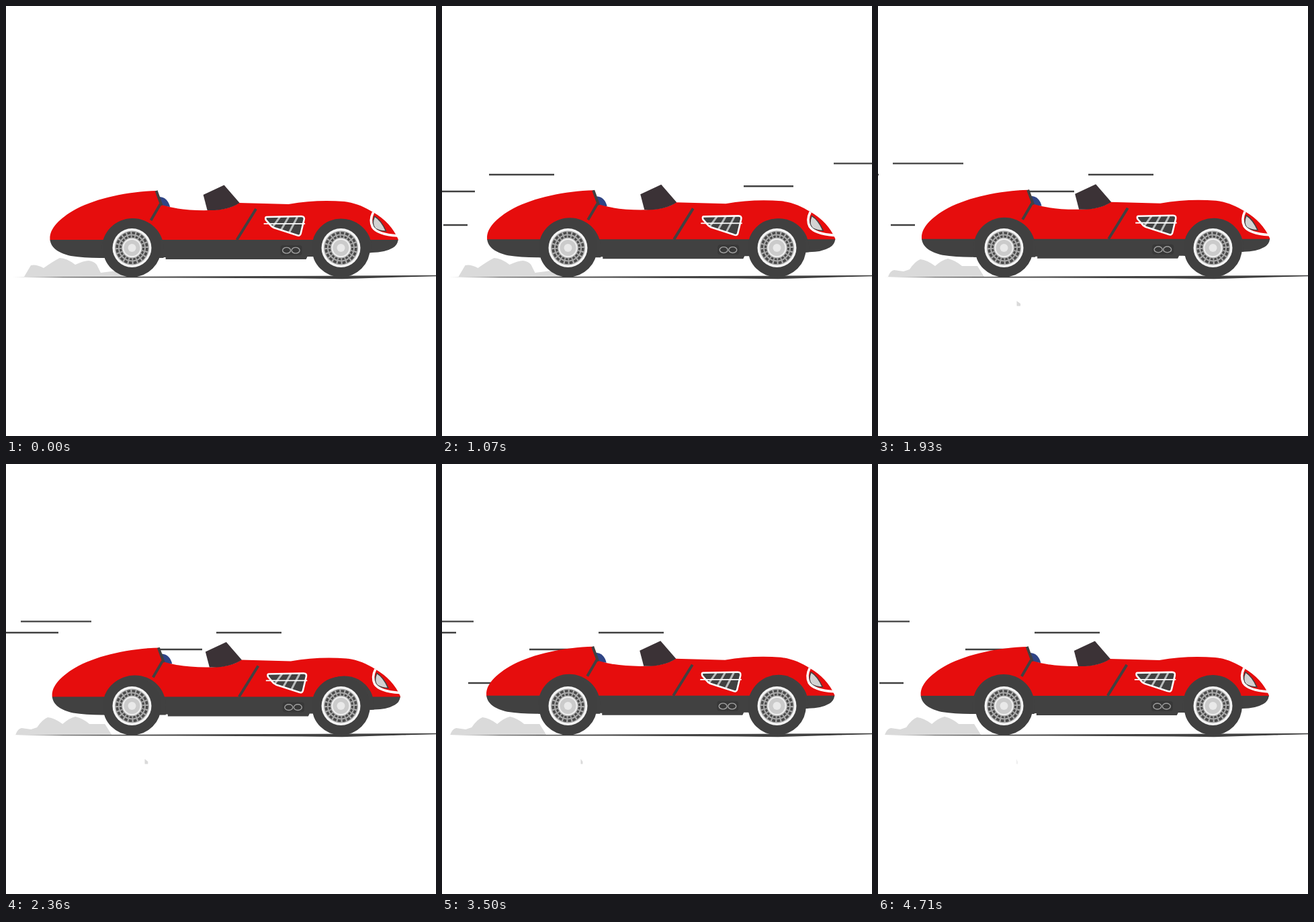
An HTML page that plays this animation: 640 px wide and 640 px high, repeating every 4.78 s.

```html
<!DOCTYPE html>
<html lang="en">
<head>
<meta charset="utf-8">
<title>Racing car</title>
<style>
  html, body { margin: 0; width: 100%; height: 100%; overflow: hidden; background: #fff; }
  svg { display: block; width: 100vw; height: 100vh; }
</style>
</head>
<body>
<svg viewBox="0 0 640 640">
  <defs>
    <linearGradient id="fade">
      <stop offset="0" stop-color="#414141" stop-opacity="0"/>
      <stop offset=".12" stop-color="#414141"/>
    </linearGradient>
    <path id="grille" d="M387 314L439 313Q444 313 443 318L438 339Q437 343 432 341L398 330Q394 328 392 325L386 318Q385 314 387 314Z"/>
    <g id="wheel">
      <circle r="43.5" fill="#404040"/>
      <circle r="29" fill="#f4f4f4"/>
      <circle r="25.5" fill="#a9a9a9"/>
      <g id="spin" fill="none" stroke="#4a4a4a">
        <circle r="22.3" stroke-width="3.6" pathLength="120" stroke-dasharray="4 2"/>
        <circle r="17" stroke-width="3" pathLength="120" stroke-dasharray="4 2"/>
      </g>
      <circle r="14.3" fill="#ededed"/>
      <circle r="12" fill="#cbcbcb"/>
      <circle r="6" fill="#e9e9e9"/>
    </g>
  </defs>

  <g id="streaks" stroke="#404040" stroke-width="2.4"></g>

  <g fill="#dadada">
    <path id="earlySmoke" d="M27 403L37 386Q45 384 56 390Q70 380 80 375Q90 375 103 385Q116 379 123 379Q131 380 135 385L141 397L165 394L187 403Z"/>
    <path id="lateSmoke" d="M15 403Q18 394 24 393L38 395L47 392Q55 380 63 377Q73 378 85 387Q95 378 104 376Q116 379 125 387L148 387L158 403Z"/>
    <path id="speck" d="M0 439L1 443V446.5H0Z"/>
  </g>

  <path fill="url(#fade)" d="M10 403.4L150 403L460 401.8L640 400.8V402.2L590 403.6L500 406.2L440 405.4L250 404.4L10 404Z"/>

  <g id="body">
    <path fill="#2f4485" d="M228 284Q240 285 243.5 299L230 298Z"/>
    <path fill="#e60d0d" d="M65 349C63 334 75 318 104 302C135 286 180 276 224 275L231 296Q260 305 302 304Q333 303 346 293L420 295C448 290 475 289 503 291C520 293 533 299 546 307Q572 322 583 347V349Z"/>
    <g fill="#414141">
      <path d="M65 348C66 360 78 368 96 372Q115 375 139 375L237 374V377H446L448 373H462L544 367Q563 367 575 360Q582 356 583 348Z"/>
      <path d="M142 375V361A46 45 0 0 1 234 361V375Z"/>
      <path d="M455 373V361A44.5 44 0 0 1 544 361V367Z"/>
    </g>
    <path fill="none" stroke="#414141" stroke-width="4" d="M223 275L231 297M229 295L215 319M371.5 302L343 348"/>
    <path fill="#3b3236" d="M293 281L324 266.5L347 293Q329 305 299 304Z"/>

    <use href="#grille" fill="#414141"/>
    <path stroke="#b9bcbc" stroke-width="3" d="M407 314L396 329M420 314L409 333M433 314L421 337"/>
    <use href="#grille" fill="none" stroke="#fff" stroke-width="2.6"/>
    <path stroke="#fff" stroke-width="1.8" d="M383 324H444.5"/>

    <rect x="408" y="356" width="32" height="15" rx="4" fill="#383838"/>
    <g fill="#383838" stroke="#a0a0a0" stroke-width="1.4">
      <ellipse cx="417" cy="363.7" rx="6" ry="4.4"/>
      <ellipse cx="430.5" cy="363.7" rx="6" ry="4.4"/>
    </g>

    <path fill="#d3d3d3" stroke="#414141" stroke-width="1.5" d="M548 313Q543 325 549 331Q556 335 565 335Q558 319 548 313Z"/>
    <path fill="none" stroke="#fff" stroke-width="3.6" d="M546 307Q540 319 545 329Q552 340 582 342"/>
  </g>

  <use href="#wheel" x="187.5" y="360"/>
  <use href="#wheel" x="498.5" y="360"/>
</svg>

<script>
const LOOP = 4780, STEPS = 67, SMOKE_CHANGE = 21;
const $ = id => document.getElementById(id);
const mod = (a, n) => (a % n + n) % n;
const wave = (step, rate) => Math.cos(2 * Math.PI * rate * (step - 59));
const transform = (node, value) => node.setAttribute("transform", value);
const show = (node, on) => node.style.display = on ? "" : "none";

function streak(x, y, width) {
  const node = document.createElementNS("http://www.w3.org/2000/svg", "path");
  node.setAttribute("d", `M0 ${y}h${width}`);
  return { x, node: $("streaks").appendChild(node) };
}

// Streaks flicker through short cycles of poses, each wrapping round from left to right
const hops = [-180, -343, -100, 0, 90];
const far = {
  wrap: 804, left: -210,
  shift: step => hops[mod(Math.floor(step * 1.76 - .3), hops.length)],
  streaks: [streak(122, 234.4, 105), streak(413, 251, 97), streak(-12, 268.3, 74),
    streak(310, 276, 82), streak(-20, 349, 75)]
};
const near = {
  wrap: 134, left: -120,
  shift: step => -57 * (mod(Math.floor(step * 1.76 - .45), 9) - 4),
  streaks: [streak(-76, 251, 97)]
};
const low = { ...near, left: -36, streaks: [streak(39, 326, 36)] };

function draw(step) {
  show($("streaks"), step > 0);
  for (const { wrap, left, shift, streaks } of [far, near, low])
    for (const { x, node } of streaks)
      transform(node, `translate(${mod(x + shift(step) - left, wrap) + left})`);

  // The body shakes on its springs while the wheels stay on the road
  const swayX = 1.6 + 2.8 * wave(step, .073);
  const swayY = -1.3 + 3 * wave(step, .336);
  transform($("body"), `translate(${swayX} ${swayY})`);
  transform($("spin"), `rotate(${step * 6})`);

  const late = step >= SMOKE_CHANGE;
  show($("earlySmoke"), !late);
  show($("lateSmoke"), late);
  show($("speck"), late);
  transform($("earlySmoke"), `translate(${-step / 6})`);
  transform($("lateSmoke"), `translate(${(27 - step) / 8})`);
  transform($("speck"), `translate(206.5) scale(${(74 - step) / 8.5} 1)`);
}

function tick() {
  draw(Math.floor((performance.now() % LOOP + 3) / LOOP * STEPS) % STEPS);
  requestAnimationFrame(tick);
}
tick();
</script>
</body>
</html>
```
